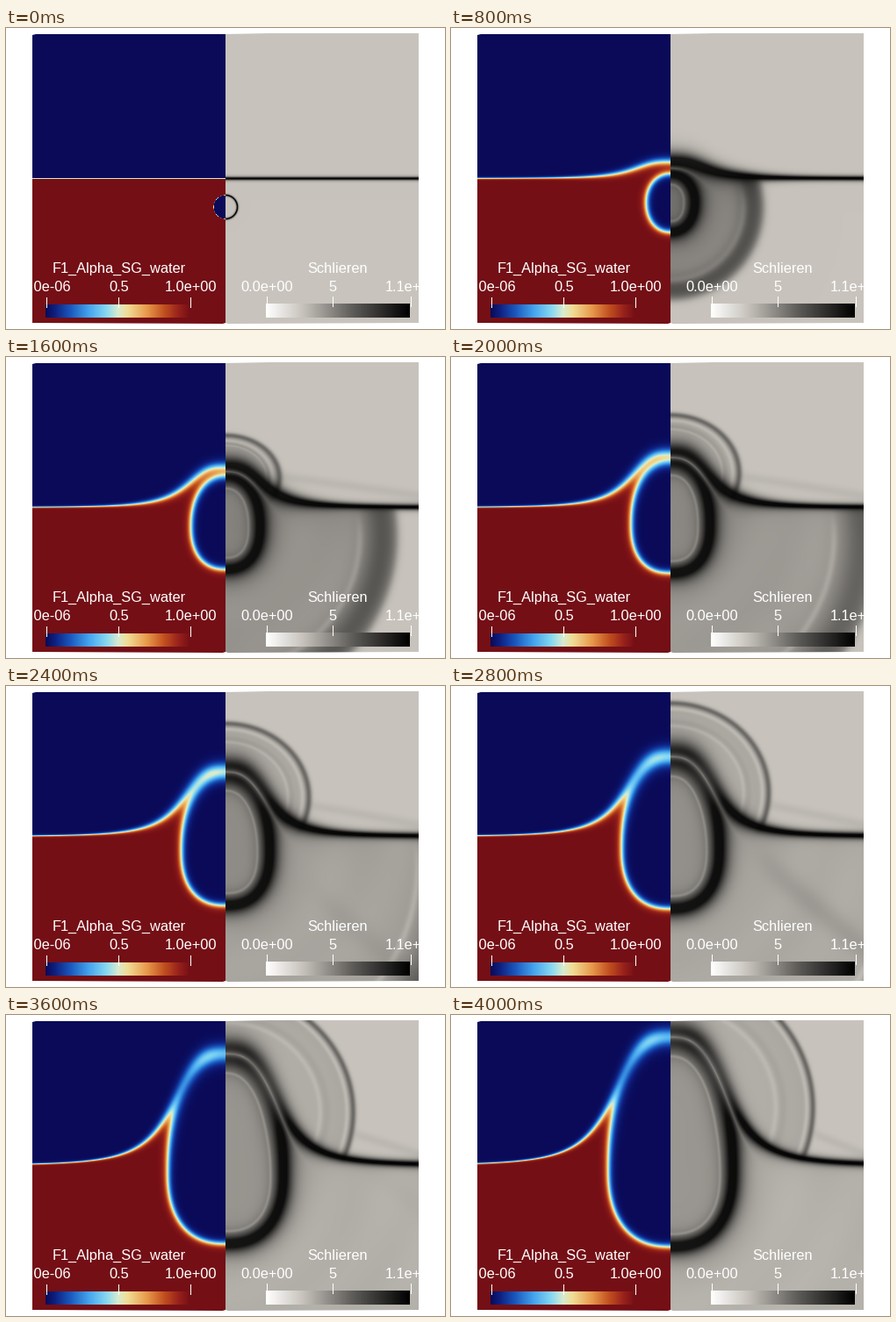
A matplotlib script for the animation above (4200 ms loop, 500 px wide and 343 px high).

```python
import numpy as np
import matplotlib.pyplot as plt
from matplotlib.animation import FuncAnimation
from matplotlib.colors import LinearSegmentedColormap
from matplotlib.patches import Polygon

W, H, DPI = 500, 343, 64
STEP, FRAMES = 200, 21
LEFT, MID, RIGHT, TOP, BOTTOM = 30, 250, 470, 6, 337
SURFACE, CENTRE = 171.5, 204

WATER_MAP = LinearSegmentedColormap.from_list("water", [
    (0, "#0a0a58"), (.07, "#0f2384"), (.17, "#1a58bd"), (.3, "#45a5ee"),
    (.42, "#86d8f2"), (.5, "#d8ecd0"), (.57, "#f1dc94"), (.7, "#e89a4c"),
    (.82, "#c2501f"), (.92, "#98221b"), (1, "#740f16")], 512)
GREY_MAP = LinearSegmentedColormap.from_list("grey", [
    (0, "#ffffff"), (.25, "#c8c4bd"), (.6, "#5f5d5a"), (1, "#000000")])
GREY = np.array([200, 196, 189]) / 255

y, x = np.mgrid[TOP:BOTTOM, 0:RIGHT - MID] + .5


def sigmoid(v):
    return 1 / (1 + np.exp(-np.clip(v, -40, 40)))


def bell(v, width):
    return np.exp(-(v / width)**2)


def bulge_height(s):
    return 148 * s**1.28


def surface(s):
    """Signed distance (positive in water) and normal of the free surface."""
    height, reach, power = bulge_height(s), 45 + 22 * s**2.5, 3 + .5 * s**2

    def curve(px):
        q = (px / reach)**power
        slope = height * power * q / (px + 1e-6) / (1 + q)**2
        return SURFACE - height / (1 + q), slope

    foot = x
    for _ in range(5):
        level, slope = curve(foot)
        pull = (x - foot + slope * (y - level)) / (1 + slope**2)
        foot = np.maximum(foot + np.clip(.7 * pull, -8, 8), 0)
    level, slope = curve(foot)
    norm = np.hypot(1, slope)
    side = np.where(y > curve(x)[0], 1, -1)
    return side * np.hypot(x - foot, y - level), -slope / norm, 1 / norm


def bubble(s):
    """Signed distance (positive outside) and normal of the bubble."""
    rx = 13.5 + 57.5 * s**.87
    top = SURFACE - bulge_height(s) + 19 * np.exp(-1.8 * s)
    bottom = 217.5 + 46.5 * s**.7
    yc = CENTRE - 28 * s
    lower = y > yc
    ry = np.where(lower, bottom - yc, yc - top)
    n = 2 + np.where(lower, .4, .2) * min(2 * s, 1)
    f = ((x / rx)**n + (np.abs(y - yc) / ry)**n)**(1 / n)
    fy, fx = np.gradient(f)
    norm = np.hypot(fx, fy) + 1e-4
    return (f - 1) / norm, fx / norm, fy / norm


def shade_water(s, d_surf, d_bub):
    front = 440 * s**.88
    gap = front - np.hypot(x, y - CENTRE)
    width = 8 + front * .07
    tone = .09 + .2 * bell(s - .2, .4)
    tone = tone + .3 * bell(gap - width * .8, width)
    tone = tone - .1 * bell(gap - front * .22, 4) * sigmoid((y - 190) / 8)
    tone = tone + .015 * np.sin(gap / 15) * np.sin((x + y) / 37 + 8 * s)
    # Wave reflected from the surface, crossing the lower right
    echo = y - 205 - .85 * (x - 110) + 400 * (s - .7)
    tone = tone + .08 * bell(echo, 18) * sigmoid((x - 110) / 10) * bell(s - .72, .15)
    halo = .28 * np.exp(-np.maximum(d_bub, 0) / 14)
    halo = halo + .2 * np.exp(-np.maximum(d_surf, 0) / 14) * bell(x, 130)
    return sigmoid(gap / 2.5) * (tone + halo) * min(20 * s, 1)


def shade_air(s):
    age = max(s - .2, 0)
    rx, ry, yc = 30 + 168 * age, 14 + 180 * age, 148 - 53 * age
    e = np.hypot(x / rx, (y - yc) / ry)
    d = (e - 1) * (rx + ry) / 2
    tone = sigmoid(-d / 1.5) * (.11 + .07 * np.exp(np.minimum(d, 0) / 20))
    tone = tone + .32 * bell(d + 2, 3.2) - .1 * bell(d + 9, 2.5)
    tone = tone + .04 * bell(e - .78, .03) - .06 * bell(e - .73, .02)
    trail = 136 + (x - rx) * 22 / (220 - rx)
    tone = tone + .06 * bell(y - trail, 6) * sigmoid((x - rx) / 2)
    return tone * np.clip(6 * age, 0, 1)


def draw_fields(s):
    d1, n1x, n1y = surface(s)
    d2, n2x, n2y = bubble(s)
    grow, late = min(5 * s, 1), min(1.4 * s, 1)
    near = bell(x, 85)
    crown = bell(x, 62) * sigmoid((150 - y) / 15)

    # Water fraction
    w1 = .1 + grow * (.5 + near * (1.5 + 2.3 * late))
    w2 = .1 + grow * (2.1 + 2.2 * late * crown)
    water = sigmoid(d1 / w1) * sigmoid(d2 / w2)

    # Gradient magnitude, dark on both sides of each interface
    v1 = .7 + grow * (.15 + .7 * late + near * (2.6 + 1.6 * late))
    v2 = .4 + grow * (2.7 + .7 * late + 1.6 * late * crown)
    s1, s2 = sigmoid(d1 / v1), sigmoid(d2 / v2)
    g1, g2 = 4 * s1 * (1 - s1) * s2, 4 * s2 * (1 - s2) * s1
    edge = np.hypot(g1 * n1x + g2 * n2x, g1 * n1y + g2 * n2y)
    edge = np.minimum(1.05 * edge**.65, .97 - .12 * grow * near)

    inner = (.2 + .36 * np.exp(-2.5 * s) - .18 * bell(d2 + 3.7 * v2, 1.8)) * grow
    tone = (s1 * s2 * shade_water(s, d1, d2) + (1 - s2) * inner
            + (1 - s1) * s2 * shade_air(s))
    tone = tone + (1 - tone) * edge
    right = np.clip((1 - tone)[..., None] * GREY, 0, 1)
    left = WATER_MAP(water[:, ::-1])[..., :3]
    return np.concatenate([left, right], axis=1)


fig = plt.figure(figsize=(W / DPI, H / DPI), dpi=DPI, facecolor="white")
ax = fig.add_axes([0, 0, 1, 1])
picture = ax.imshow(draw_fields(0), extent=(LEFT, RIGHT, BOTTOM, TOP),
                    interpolation="nearest", aspect="auto")
outline = Polygon([(30, 8), (34, 7), (250, 7), (300, 6), (470, 6), (470, 336),
                   (253, 337), (250, 336), (247, 337), (30, 336)],
                  transform=ax.transData)
picture.set_clip_path(outline)


def label(cx, base, text, size=16.4):
    ax.text(cx, base, text, color="white", ha="center", va="baseline",
            family="Liberation Sans", fontsize=size * 72 / DPI)


def color_bar(x0, x1, top, cmap, title, title_x, ticks):
    ax.imshow(np.linspace(0, 1, 256)[None], cmap=cmap, aspect="auto",
              extent=(x0, x1, 330, top), zorder=2)
    label(title_x, 279, title)
    for tx, text in ticks:
        ax.plot([tx, tx], [top - 8, top + 3], color="white", lw=72 / DPI, zorder=3)
        label(tx + .8, 299.5, text)


color_bar(45, 210, 315, WATER_MAP, "F1_Alpha_SG_water", 129,
          [(45.5, "1.0e-06"), (127.5, "0.5"), (209.5, "1.0e+00")])
color_bar(296, 460, 314, GREY_MAP, "Schlieren", 378,
          [(296.5, "0.0e+00"), (371.5, "5"), (460.5, "1.1e+01")])
ax.set(xlim=(0, W), ylim=(H, 0))
ax.axis("off")


def update(frame):
    picture.set_data(draw_fields(frame / (FRAMES - 1)))
    return [picture]


animation = FuncAnimation(fig, update, frames=FRAMES, interval=STEP,
                          repeat=True, repeat_delay=0)
plt.show()
```
